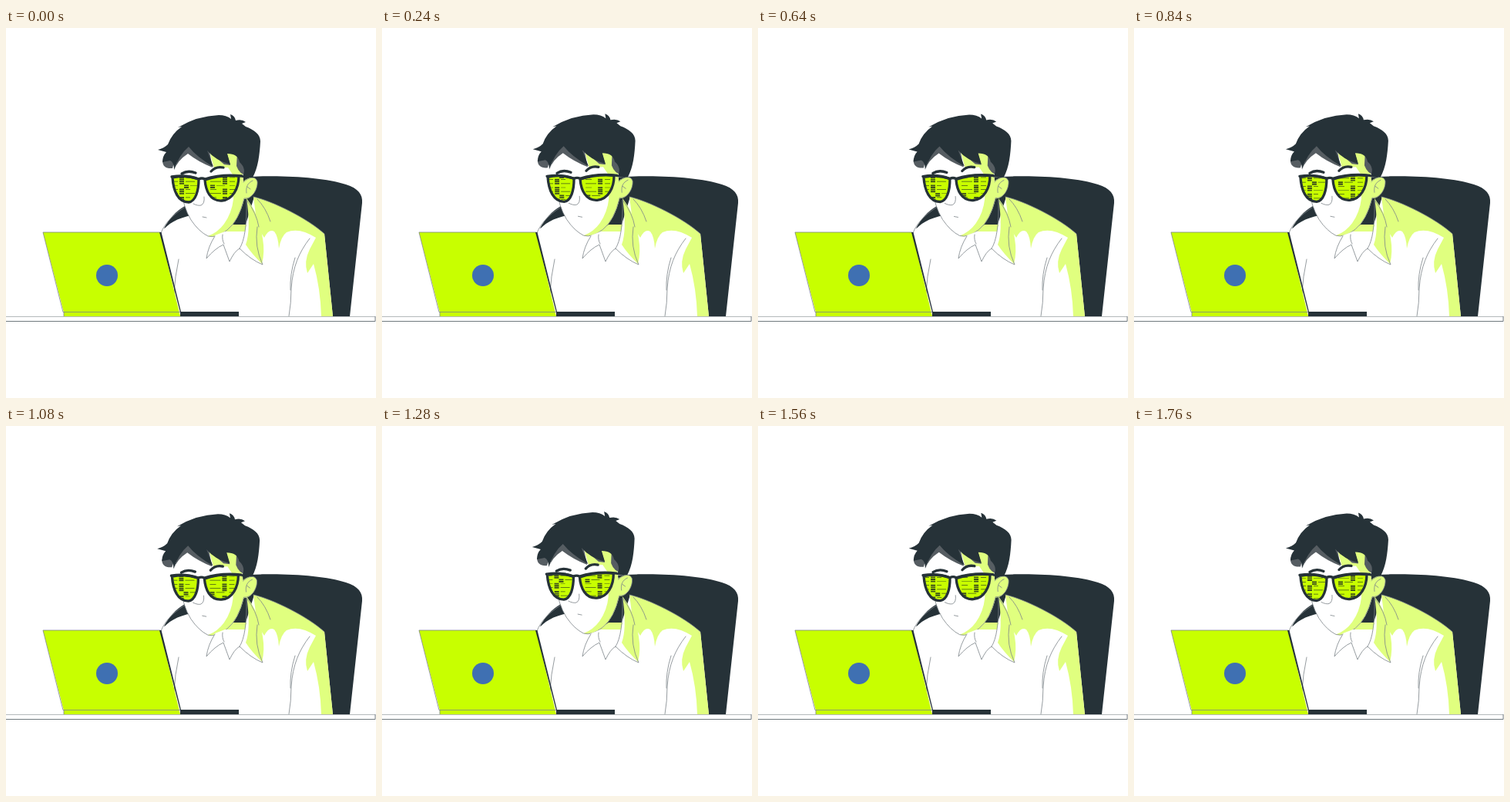
An HTML page for the animation above (1800 ms loop, 480 by 480 pixels).

```html
<!DOCTYPE html>
<html lang="en">
<head>
<meta charset="utf-8">
<title>Working at a laptop</title>
<style>
html, body { margin: 0; width: 100%; height: 100%; overflow: hidden; background: #fff; }
svg { display: block; width: 100%; height: 100%; }
.dark { fill: #263238; }
.lime { fill: #c8ff00; }
.pale { fill: #e0ff7f; }
.grey { fill: #565d62; }
.white { fill: #fff; }
.thin { fill: none; stroke: #7b8388; stroke-width: .8; stroke-linecap: round; stroke-linejoin: round; }
.frame { fill: none; stroke: #263238; stroke-width: 3.3; stroke-linejoin: round; stroke-linecap: round; }
</style>
</head>
<body>
<svg viewBox="0 0 480 480">
  <defs>
    <path id="lensL" d="M216 194Q233 190 250 196C250 211 246 225 237 226C223 226 217 211 216 194Z"/>
    <path id="lensR" d="M258 197Q279 190 302 192C302 208 294 223 280 224C265 225 259 211 258 197Z"/>
    <clipPath id="lenses"><use href="#lensL"/><use href="#lensR"/></clipPath>
  </defs>

  <!-- chair -->
  <path class="dark" d="M300 194C350 190 410 193 441 203C457 208 463 216 462 227L446 374H400L285 262Z"/>
  <path class="dark" d="M205 260C211 248 220 238 232 231L244 248L215 256Z"/>

  <!-- torso -->
  <path class="white" d="M201 266C210 253 222 247 241 243L262 262L284 263L310 258L322 219Q380 241 413 267L424 374H226Z"/>
  <path class="thin" d="M201 266C206 253 216 243 231 233"/>
  <path class="pale" d="M321 219C345 224 393 248 413 267L424 374H409Q408 338 399 306L391 318Q386 303 394 287L402 272Q380 258 364 265Q357 270 354 286Q353 270 348 264Q341 260 335 272L326 258Z"/>
  <path class="thin" d="M321 219C345 224 393 248 413 267M326 222Q337 233 343 251M394 273C380 291 372 310 370 338Q370 357 367 374M375 298Q368 320 369 340M224 300Q219 323 218 344"/>
  <path class="pale" d="M280 264L294 255H312L310 264Z"/>

  <g id="head">
    <!-- face -->
    <path class="white" d="M222 165L228 205Q229 231 240 249Q250 264 262 270Q273 273 287 262Q302 250 309 221L306 160L240 145Z"/>
    <path class="pale" d="M264 160L270 182L288 181L294 190L295 222Q293 240 283 254Q275 265 262 270Q273 273 287 262Q302 250 309 222C320 222 327 208 326 199C324 192 315 193 308 199L304 160Z"/>
    <path class="thin" d="M229 217Q230 232 240 249Q250 264 262 270Q273 273 287 262Q302 250 309 221C320 222 327 208 326 199C324 192 315 193 308 200M320 198C313 201 311 207 312 214M313 206L317 209M257 219Q258 228 253 230Q249 231 243 228M255 245L260 246"/>

    <!-- hair -->
    <path class="grey" d="M203 172Q203 183 216 182L222 160Z M218 185Q222 172 236 163Q250 174 268 181L262 150H230Z M262 159L283 177L291 178L286 161H300L299 179Q303 190 312 191L318 160L262 145Z"/>
    <path class="dark" d="M197 158Q205 156 210 151Q215 137 228 128L223 129Q248 114 276 113Q286 113 292 118L291 112Q297 114 298 120Q306 118 311 122L306 124L311 128C322 132 330 138 330 147C329 165 327 181 320 194H306Q313 183 303 174Q301 163 287 163L291 177Q272 172 261 159L269 180Q247 167 237 154Q225 164 218 184Q218 174 213 172L203 174Q203 166 208 161Z"/>
    <path class="frame" d="M228 189Q236 184 246 188M266 186Q272 179 282 181"/>

    <!-- glasses -->
    <use class="lime" href="#lensL"/><use class="lime" href="#lensR"/>
    <g clip-path="url(#lenses)"><path id="code" fill="#40521a"/></g>
    <use class="frame" href="#lensL"/><use class="frame" href="#lensR"/>
    <path class="frame" d="M215 193Q234 190 250 196Q254 194 258 196Q280 189 306 192"/>
  </g>

  <!-- collar -->
  <path class="white" d="M271 269Q262 284 260 299Q271 286 282 281L290 303Q296 290 303 286L313 264H284Z"/>
  <path class="pale" d="M312 221Q328 241 333 273Q336 291 332 306Q318 292 311 281Q318 262 312 221Z"/>
  <path class="thin" d="M271 270Q262 284 260 299Q271 286 282 281L290 303Q296 290 303 286Q318 301 333 307Q322 284 326 258M283 280Q280 275 281 268M303 286Q313 271 312 223Q325 240 328 258"/>

  <!-- laptop -->
  <path class="lime" d="M48 265H200L226 374H75V369Z"/>
  <path class="thin" d="M200 265H48L74 368.5H226M75 369V374"/>
  <path class="dark" d="M199 265H201.5L227 368H302V374H226V369Z"/>
  <circle cx="131" cy="321" r="14" fill="#3f70b2"/>

  <!-- desk -->
  <path class="white" d="M0 374H479V381H0Z"/>
  <path d="M0 374.5H479" stroke="#b4b9bb"/>
  <path d="M0 380.5H479V374" fill="none" stroke="#70797e"/>
</svg>
<script>
const LOOP = 1800, SWAY = 900, BOB = 600, SCROLL = 450, STEP = 40;
const ROWS = 10, GAP = 2.6;
const $ = id => document.getElementById(id);
const turn = (t, period) => 2 * Math.PI * t / period;
const bar = (x, y, w, h) => `M${x} ${y}h${w}v${h}h${-w}z`;

// Lines of code: blocks change column with the row, thin lines fill the rest
function codeRows() {
  let d = "";
  for (let i = -ROWS; i < ROWS * 2; i++) {
    const r = (i + ROWS) % ROWS, y = 193 + i * GAP;
    const inner = r === 4 || r === 5;
    if (r !== 9) d += bar(inner ? 231 : 225, y, 6, 1.9) + bar(inner ? 265 : 281, y, 6, 1.9);
    if (r % 2 === 0) {
      d += bar(218, y + .5, 5, .7) + bar(inner ? 239 : 233, y + .5, 6 + r % 3 * 3, .7);
      d += bar(inner ? 273 : 265, y + .5, 8 + r % 3 * 3, .7) + bar(290, y + .5, 7, .7);
    }
  }
  return d;
}

function draw(now) {
  const t = Math.floor(now % LOOP / STEP) * STEP;
  // the head leans left, pivoting at the neck, and nods a little faster
  const k = .0165 * (1 - Math.cos(turn(t, SWAY))) / 2;
  const nod = -1.2 * Math.sin(turn(t, BOB));
  $("head").setAttribute("transform", `matrix(1 0 ${k} 1 ${-300 * k} ${nod})`);
  $("code").setAttribute("transform", `translate(0 ${t % SCROLL / SCROLL * ROWS * GAP})`);
  requestAnimationFrame(draw);
}

$("code").setAttribute("d", codeRows());
requestAnimationFrame(draw);
</script>
</body>
</html>
```
